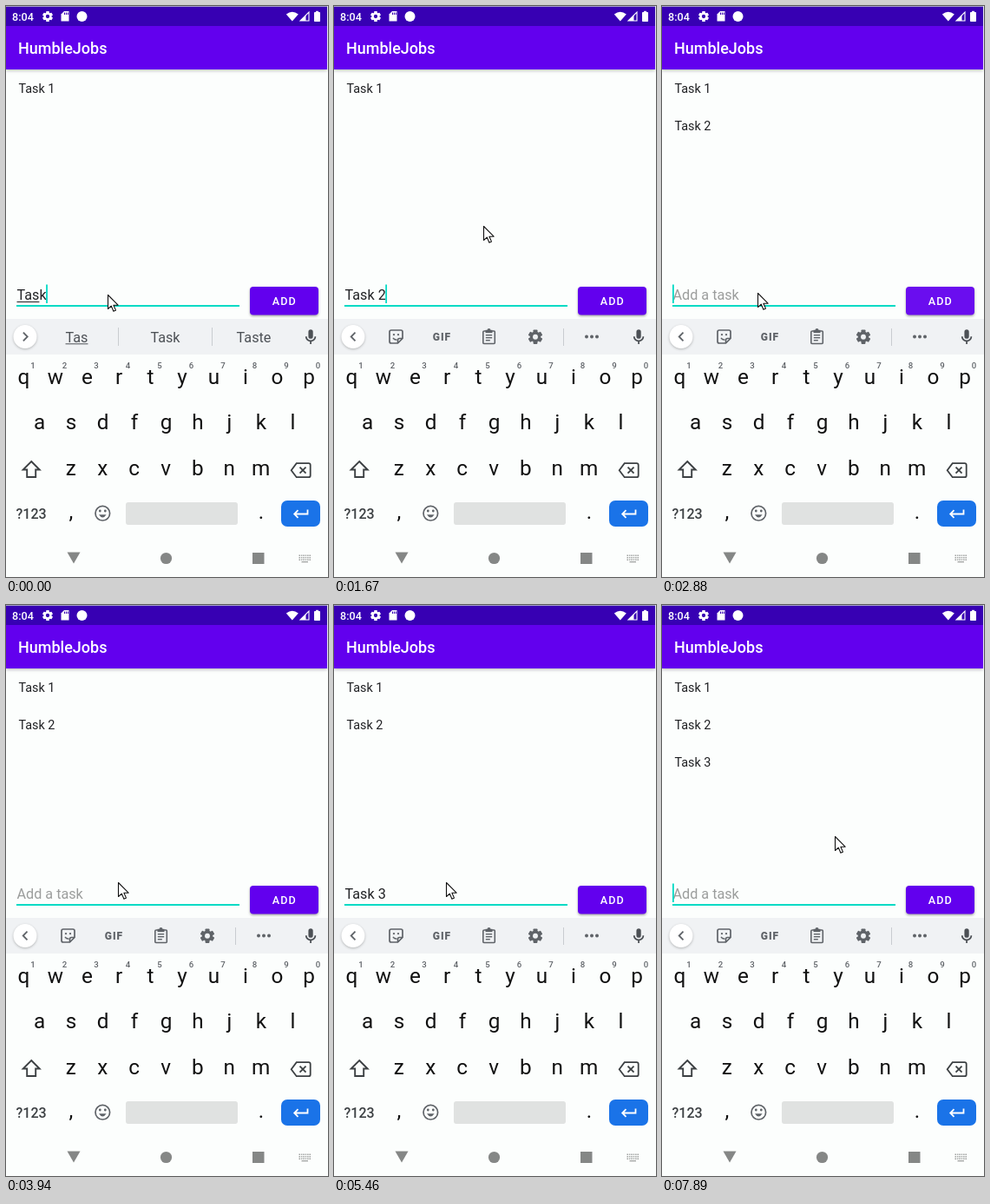
An HTML page with a canvas that plays this animation: 371 px wide and 657 px high, repeating every 8 s.

```html
<!DOCTYPE html>
<html lang="en">
<head>
<meta charset="utf-8">
<title>Task list</title>
<style>
html, body { margin: 0; width: 100%; height: 100%; overflow: hidden; background: #fcfefd; }
canvas { display: block; width: 371px; height: 657px; }
</style>
</head>
<body>
<canvas id="stage"></canvas>
<script>
const W = 371, H = 657, LOOP = 8000;
const TEAL = '#03dac5', PURPLE = '#6200ee', PAPER = '#fcfefd', INK = '#202124', GREY = '#5f6368';
const canvas = document.getElementById('stage');
const ratio = window.devicePixelRatio || 1;
canvas.width = W * ratio;
canvas.height = H * ratio;
const c = canvas.getContext('2d');
c.scale(ratio, ratio);

// Timelines: each entry holds from its time until the next one.
const mouse = [
  [0, 117, 332], [1400, 150, 300], [1520, 172, 261], [1670, 172, 253], [1820, 245, 310],
  [1940, 340, 373], [2060, 358, 351], [2210, 330, 348], [2370, 294, 347], [2750, 215, 336],
  [2880, 110, 330], [3000, 13, 325], [3140, 129, 319], [6420, 135, 330], [6540, 154, 273],
  [6690, 235, 130], [6810, 305, 48], [6930, 358, 206], [7080, 327, 347], [7200, 340, 370],
  [7350, 335, 347], [7750, 300, 336], [7890, 199, 266]
];
// time, text, number of underlined letters
const field = [
  [0, 'Task', 3], [250, 'Task', 4], [400, 'Task 2', 0], [2490, '', 0],
  [4340, 'T', 1], [4590, 'Ta', 2], [4710, 'Tas', 3], [4830, 'Task', 3],
  [4950, 'Task', 4], [5070, 'Task 3', 0], [7620, '', 0]
];
// time, words; an empty string is the bare strip, null the tool row
const strip = [
  [0, 'Tas Task Taste'], [250, 'Task Tasks Tasked'], [400, '2 2nd 2020'], [550, ''], [700, null],
  [4340, 'T The To'], [4590, 'Ta Take Tab'], [4710, 'Tas Task Taste'],
  [4950, 'Task Tasks Tasked'], [5070, '3 3rd 3000'], [5220, ''], [5340, null]
];
const caret = [
  [0, 1], [870, 0], [1400, 1], [1940, 0], [2490, 1], [3000, 0], [3530, 1],
  [3940, 0], [4340, 1], [5460, 0], [6020, 1], [6420, 0], [7080, 1]
];
const ripple = [
  [0, 0], [2370, .12], [2490, .22], [2630, .2], [2750, .12], [2880, .05], [3000, 0],
  [7500, .12], [7620, .22], [7750, .12], [7890, 0]
];
const tasks = [[0, 1], [2630, 2], [7750, 3]];

function at(line, t) {
  let hit = line[0];
  for (const step of line) if (step[0] <= t) hit = step;
  return hit;
}

function rect(x, y, w, h, color, r = 0) {
  c.fillStyle = color;
  c.beginPath();
  c.roundRect(x, y, w, h, r);
  c.fill();
}

function disc(x, y, r, color) {
  c.fillStyle = color;
  c.beginPath();
  c.arc(x, y, r, 0, Math.PI * 2);
  c.fill();
}

function text(s, x, y, size, color, align = 'left', weight = 400, spacing = 0) {
  c.font = `${weight} ${size}px Roboto, sans-serif`;
  c.letterSpacing = spacing + 'px';
  c.textAlign = align;
  c.fillStyle = color;
  c.fillText(s, x, y);
  const width = c.measureText(s).width;
  c.letterSpacing = '0px';
  return width;
}

function shape(d, x, y, fill, stroke, width = 1, scale = 1) {
  c.save();
  c.translate(x, y);
  c.scale(scale, scale);
  const path = new Path2D(d);
  if (fill) { c.fillStyle = fill; c.fill(path); }
  if (stroke) { c.strokeStyle = stroke; c.lineWidth = width; c.stroke(path); }
  c.restore();
}

function shadow(color, blur, dy) {
  c.shadowColor = color;
  c.shadowBlur = blur * ratio;
  c.shadowOffsetY = dy * ratio;
}

function gear(x, y, r, color, hole) {
  c.save();
  c.translate(x, y);
  disc(0, 0, r * .76, color);
  for (let i = 0; i < 6; i++) {
    rect(-r * .3, -r, r * .6, r * .5, color, r * .1);
    c.rotate(Math.PI / 3);
  }
  disc(0, 0, r * .36, hole);
  c.restore();
}

function drawBars() {
  shadow('rgba(0,0,0,.3)', 4, 1);
  rect(0, 23, W - 1, 50, PURPLE);
  shadow('transparent', 0, 0);
  rect(0, 0, W - 1, 23, '#3700b3');
  rect(0, 0, W, 1, '#a49cc9');
  rect(W - 1, 0, 1, 73, '#e8e6f0');
  text('8:04', 7, 16.5, 12.6, '#fff', 'left', 500);
  gear(48, 12, 6, '#fff', '#3700b3');
  shape('M3.5 0H9V11.5H0V3.5Z', 63.5, 6, '#fff');
  for (let i = 0; i < 3; i++) rect(67 + i * 1.9, 7.5, 1, 2.4, '#3700b3');
  disc(87.5, 12, 6, '#fff');
  shape('M-7 -8Q0 -13.5 7 -8L0 0Z', 329.8, 17.5, '#fff');
  shape('M0 10H10V0Z', 339, 7, null, '#fff', 1.1);
  shape('M0 10H6.5V3.5Z', 339, 7, '#fff');
  rect(355, 7, 7, 11, '#fff', .8);
  rect(357, 5.8, 3, 2, '#fff');
  text('HumbleJobs', 14, 54.5, 18, '#fff', 'left', 500);
}

function drawList(count) {
  for (let i = 0; i < count; i++) text('Task ' + (i + 1), 14.4, 100 + 43 * i, 14.4, INK);
}

function drawField(t) {
  const [, value, marked] = at(field, t);
  rect(12, 344, 257, 2, TEAL);
  let width = 0;
  if (value) width = text(value, 12.5, 338, 16.2, INK);
  else text('Add a task', 12.5, 338, 16.2, '#9b9d9c');
  if (marked) rect(12.5, 340, c.measureText(value.slice(0, marked)).width, 1, INK);
  if (at(caret, t)[1]) rect(12 + width, 320.5, 1.8, 21.5, TEAL);
}

function drawButton(glow) {
  shadow('rgba(0,0,0,.35)', 3, 1.5);
  rect(281, 323, 79, 32.5, PURPLE, 4);
  shadow('transparent', 0, 0);
  if (glow) rect(281, 323, 79, 32.5, `rgba(255,255,255,${glow})`, 4);
  text('ADD', 306.8, 344, 12.6, '#fff', 'left', 500, 1.1);
}

function drawTools() {
  // sticker
  shape('M2 0H13Q15 0 15 2V9.5L9.5 15H2Q0 15 0 13V2Q0 0 2 0ZM9.5 15V11.5Q9.5 9.5 11.5 9.5H15',
    64, 373, null, GREY, 1.7);
  disc(69, 378.2, 1.1, GREY);
  disc(74, 378.2, 1.1, GREY);
  shape('M-3 0Q-1 2.5 1.5 1.8', 71, 382, null, GREY, 1.4);
  text('GIF', 113.7, 384.6, 12, GREY, 'left', 900, 1);
  // clipboard
  shape('M1.5 0H12.5Q13.5 0 13.5 1V13.5Q13.5 14.5 12.5 14.5H1Q0 14.5 0 13.5V1Q0 0 1.5 0Z',
    171.8, 374, null, GREY, 1.6);
  rect(174.5, 372.8, 8, 3.4, GREY);
  disc(178.5, 373, 2, GREY);
  for (let i = 0; i < 3; i++) rect(174.8, 378 + 3 * i, i < 2 ? 7.4 : 5, 1.4, GREY);
  gear(232, 380.7, 8.2, GREY, '#f0f2f4');
  rect(264, 371, 1, 20, '#c9ccd0');
  for (let i = -1; i < 2; i++) disc(297 + i * 6, 380.5, 2, GREY);
}

function drawWords(words) {
  if (!words) return;
  words.split(' ').forEach((word, i) => {
    const x = 81.5 + 102 * i;
    const width = text(word, x, 387, 16.2, '#4c5055', 'center');
    if (!i) rect(x - width / 2, 388.3, width, 1, '#4c5055');
  });
  rect(129, 370, 1, 21, '#c9ccd0');
  rect(237, 370, 1, 21, '#c9ccd0');
}

function drawStrip(words) {
  rect(0, 360, W, 41, '#f0f2f4');
  shadow('rgba(0,0,0,.25)', 3, 1);
  disc(22, 380.5, 13.5, '#fff');
  shadow('transparent', 0, 0);
  const dir = words === null ? -1 : 1;
  shape(`M${-2.3 * dir} -4.8L${2.5 * dir} 0L${-2.3 * dir} 4.8`, 22.2, 380.5, null, GREY, 1.8);
  if (words === null) drawTools();
  else drawWords(words);
  shape('M12 14a3 3 0 0 0 3-3V5a3 3 0 0 0-6 0v6a3 3 0 0 0 3 3z' +
    'M17 11a5 5 0 0 1-10 0H5c0 3.5 2.6 6.4 6 6.9V21h2v-3.1c3.4-.5 6-3.4 6-6.9z',
    340.5, 370.5, '#4c5055', null, 1, .88);
}

function drawKeys() {
  const rows = [['qwertyuiop', 20.5, 434.5], ['asdfghjkl', 38.5, 487], ['zxcvbnm', 74.7, 540]];
  for (const [letters, x, y] of rows)
    [...letters].forEach((ch, i) => text(ch, x + 36.5 * i, y, 24.3, '#111', 'center'));
  for (let i = 0; i < 10; i++)
    text(String((i + 1) % 10), 31 + 36.5 * i, 416.5, 9.6, GREY, 'center', 500);

  shape('M0 -9.5L9.5 0H5V8.5H-5V0H-9.5Z', 29.2, 533.5, null, '#3c4043', 1.9);
  shape('M-5 -8H9Q11 -8 11 -6V6Q11 8 9 8H-5L-11 0Z', 339.7, 534.2, null, '#3c4043', 1.8);
  shape('M-3.5 -3.5L3.5 3.5M3.5 -3.5L-3.5 3.5', 342, 534.2, null, '#3c4043', 1.8);

  text('?123', 11.5, 590, 16, '#3c4043', 'left', 500);
  text(',', 75, 590, 24.3, '#111', 'center');
  text('.', 294, 590, 24.3, '#111', 'center');
  shape('M8.3 0A8.3 8.3 0 1 1 -8.3 0A8.3 8.3 0 1 1 8.3 0', 111.3, 583.7, null, GREY, 1.7);
  disc(108.3, 581, 1.4, GREY);
  disc(114.3, 581, 1.4, GREY);
  shape('M-4.3 0Q0 6.5 4.3 0Z', 111.3, 585.3, GREY);
  rect(138, 571, 129, 26, '#e0e2e1', 3);
  rect(317, 569, 45, 30, '#1a73e8', 7);
  shape('M8 -5V0H-7M-3 -4.3L-7.3 0L-3 4.3', 339.5, 584.5, null, '#fff', 1.8);
}

function drawNav() {
  const tone = '#858786';
  shape('M-7.5 -6H7.5L0 7Z', 78, 634.5, tone);
  disc(184.5, 635.5, 6.6, tone);
  rect(284, 629, 13.5, 13, tone);
  for (let row = 0; row < 3; row++)
    for (let i = 0; i < 6; i++) rect(337.5 + 2.4 * i, 631.5 + 2.5 * row, 1.5, 1.4, '#a0a2a1');
  rect(340.5, 639, 7.5, 1.3, '#a0a2a1');
}

function drawMouse([, x, y]) {
  c.lineJoin = 'round';
  shape('M0 0V16L3.8 12.6L6.4 18.7L9 17.6L6.4 11.7H11.6Z', x + .5, y + .5, '#fff', '#111', 1.1);
  c.lineJoin = 'miter';
}

function draw(t) {
  rect(0, 0, W, H, PAPER);
  drawBars();
  drawList(at(tasks, t)[1]);
  drawField(t);
  drawButton(at(ripple, t)[1]);
  drawStrip(at(strip, t)[1]);
  drawKeys();
  drawNav();
  drawMouse(at(mouse, t));
}

const start = performance.now();
function frame() {
  draw((performance.now() - start) % LOOP);
  requestAnimationFrame(frame);
}
frame();
</script>
</body>
</html>
```
